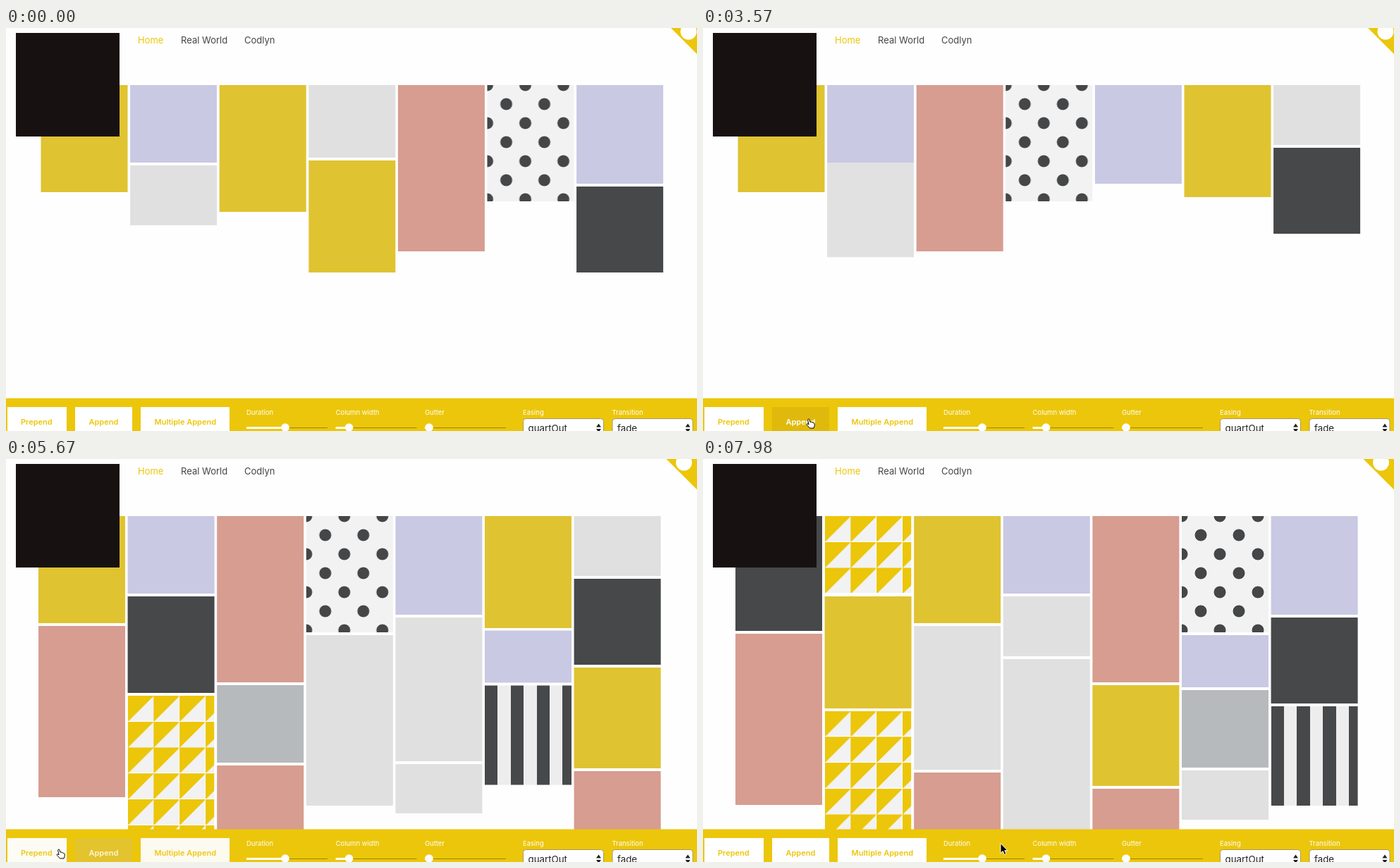
Recreate the animation shown at these times as an HTML page. Size 980 by 572 pixels, loop 8000 ms.

```html
<!DOCTYPE html>
<html lang="en">
<head>
<meta charset="utf-8">
<title>Stacking tiles</title>
<style>
html, body { margin: 0; width: 100%; height: 100%; overflow: hidden; background: #fefefe; }
#grid, svg { position: absolute; left: 0; top: 0; width: 980px; height: 572px; overflow: hidden; }
#grid { isolation: isolate; }
.tile { position: absolute; left: 0; top: 0; width: 122.5px; }
.yellow { background: #dfc331; }
.lilac { background: #c9c9e4; }
.light { background: #e0e0e0; }
.salmon { background: #d69d90; }
.dark { background: #47484a; }
.gray { background: #b7babd; }
.dots {
  --dot: radial-gradient(#454648 8.1px, #45464800 8.8px);
  background: var(--dot) 0 0 / 54px 54px, var(--dot) -27px -27px / 54px 54px, #f2f2f2;
}
.stripes { background: repeating-linear-gradient(90deg, #47484a 0 18.4px, #ededed 18.4px 36.8px); }
.triangles {
  background: linear-gradient(135deg, #ecc60a 50%, #f2f2f2 50.5%) 0 0 / 36.75px 36.75px;
  mask: repeating-linear-gradient(90deg, #000 0 36px, #0000 36px 36.75px),
        repeating-linear-gradient(#000 0 36px, #0000 36px 36.75px);
  mask-composite: intersect;
}
text { font-family: Inter, "Open Sans", sans-serif; white-space: pre; }
.nav { font-size: 13px; fill: #444; }
.label { font-size: 9.5px; fill: #fff; }
.btn { font-size: 11px; font-weight: 600; }
.value { font-size: 13.3px; fill: #222; }
</style>
</head>
<body>
<div id="grid"></div>
<svg viewBox="0 0 980 572">
  <rect x="14" y="7" width="147" height="147" fill="#171112"/>
  <g class="nav">
    <text x="187" y="22" style="fill:#ecc60a">Home</text>
    <text x="248" y="22">Real World</text>
    <text x="338" y="22">Codlyn</text>
  </g>
  <g id="corner">
    <path d="M943 0H1000V57Z" fill="#ecc60a"/>
    <circle cx="968" cy="5" r="11.5" fill="#fff"/>
  </g>
  <rect y="525.5" width="980" height="47" fill="#ecc60a"/>
  <g id="controls"></g>
  <g id="cursor">
    <path id="arrow" d="M0 0V14L3.3 11L5.5 16L8 15L5.8 10.2H10Z" fill="#000" stroke="#fff"/>
    <path id="hand" d="M.6 1.2C1-.4 2.6-.3 3 1L4 4.4C5 3.6 6 4 6.3 4.9C7.2 4.3 8.2 4.8 8.4 5.6C9.4 5.2 10 6 10.1 7L10.2 9.5L9 13H3.6L.2 9.4C-1.8 7.4-.4 6 1 7.2L2 8Z" fill="#fff" stroke="#000"/>
  </g>
</svg>
<script>
const LOOP = 8000, DURATION = 480, TOP = 81, PITCH = 126.6, GAP = 4, COLUMNS = 7, DRIFT = 8;
const $ = id => document.getElementById(id);
const clamp = v => Math.max(0, Math.min(1, v));
const mix = (a, b, p) => a + (b - a) * p;
const quartOut = p => 1 - (1 - clamp(p)) ** 4;

// One letter per tile, in stacking order from "a"
const specs = `yellow 152,lilac 110,yellow 180,light 103,salmon 236,dots 165,lilac 140,yellow 158.5,
light 85,dark 122,dark 137,light 204,salmon 243,lilac 74,light 242,yellow 143,gray 110,stripes 141,
triangles 200,light 70,salmon 160,salmon 160,triangles 110,dark 163`.split(/,\s*/);
const tiles = {};
specs.forEach((spec, i) => {
  const [kind, h] = spec.split(' ');
  const el = document.createElement('div');
  el.className = 'tile ' + kind;
  el.style.height = h + 'px';
  tiles[String.fromCharCode(97 + i)] = { el, h: +h, moves: [] };
});
for (const id of 'xw' + Object.keys(tiles).join('').slice(0, -2)) $('grid').append(tiles[id].el);

// time, order, left edge, lag of the lower rows
const steps = [
  [-9000, 'abcdefghij', 49.5, 0],
  [1755, 'abdefghij', 49.5, 0],
  [2350, 'abefghij', 49.5, 0],
  [3551, 'abefghijk', 49.5, 0],
  [3850, 'abefghijkl', 49.5, 0],
  [4688, 'abefghijklmnopq', 49.5, 0],
  [5000, 'abefghijklmnopqrstuv', 46, 0],
  [6037, 'wabefghijklmnopqrstuv', 46, 22],
  [6222, 'xwabefghijklmnopqrstuv', 46, 22],
  [7505, 'xwabefghijlmnopqrstuv', 46, 0]
];

// Each tile goes to the shortest column
function layout(order, left, unmeasured = '') {
  const ends = Array(COLUMNS).fill(TOP), spots = {};
  for (const id of order) {
    const c = ends.indexOf(Math.min(...ends));
    spots[id] = { x: left + c * PITCH, y: ends[c], a: 1 };
    ends[c] += (unmeasured.includes(id) ? 0 : tiles[id].h) + GAP;
  }
  return spots;
}

function poseAt(tile, t) {
  const move = tile.moves.findLast(m => m.t <= t);
  if (!move) return { x: 0, y: 0, a: 0 };
  const p = quartOut((t - move.t) / DURATION), { from, to } = move;
  return { x: mix(from.x, to.x, p), y: mix(from.y, to.y, p), a: mix(from.a, to.a, p) };
}

let previous = '';
for (const [time, order, left, lag] of steps) {
  const fresh = [...order].filter(id => !previous.includes(id)).join('');
  const spots = layout(order, left), entry = layout(order, left, fresh);
  for (const id of order) {
    const to = spots[id], t = time + (to.y > TOP ? lag : 0);
    const from = fresh.includes(id)
      ? { x: entry[id].x, y: entry[id].y - DRIFT, a: 0 }
      : poseAt(tiles[id], t);
    tiles[id].moves.push({ t, from, to });
  }
  for (const id of previous) {
    if (order.includes(id)) continue;
    const from = poseAt(tiles[id], time);
    tiles[id].moves.push({ t: time, from, to: { x: from.x, y: from.y + DRIFT, a: 0 } });
  }
  previous = order;
}

// label, x, width, text x, hover spans
const buttons = [
  ['Prepend', 2, 84, 21, [[5665, 6790]]],
  ['Append', 98, 81, 117.5, [[3290, 4350], [5490, 5650]]],
  ['Multiple Append', 191, 126, 210.5, [[4390, 5530]]]
];
const face = (label, x, w, tx, bg, fg) =>
  `<rect x="${x}" y="538" width="${w}" height="40" fill="${bg}"/><text class="btn" x="${tx}" y="562.5" fill="${fg}">${label}</text>`;
const slider = (label, x, knob) =>
  `<text class="label" x="${x}" y="548.5">${label}</text>
  <path d="M${x} 567.5H${x + 115}" stroke="#9c8410"/>
  <path d="M${x} 567.5H${knob}" stroke="#fff" stroke-width="3"/>
  <circle cx="${knob}" cy="567" r="5.8" fill="#fff"/>`;
const select = (label, x, value) =>
  `<text class="label" x="${x}" y="548.5">${label}</text>
  <rect x="${x + .5}" y="554.5" width="114" height="26" rx="4" fill="#fff" stroke="#a99a5c"/>
  <text class="value" x="${x + 7.5}" y="572.5">${value}</text>
  <path d="M${x + 104} 566.5l3.5-5l3.5 5zM${x + 104} 569l3.5 5l3.5-5z" fill="#222"/>`;
$('controls').innerHTML =
  buttons.map(([label, x, w, tx], i) =>
    face(label, x, w, tx, '#fff', '#ecc60a') +
    `<g id="hover${i}">${face(label, x, w, tx, '#dfba0c', '#fff')}</g>`).join('') +
  slider('Duration', 341, 396) + slider('Column width', 467.5, 486.5) + slider('Gutter', 594, 600) +
  select('Easing', 733, 'quartOut') + select('Transition', 859.5, 'fade');

const path = [
  [470, 529, 512], [640, 529, 512], [650, 508, 460], [1100, 508, 460], [1600, 332, 216],
  [2190, 332, 216], [2300, 340, 150], [2500, 340, 150], [3100, 161, 530], [3200, 161, 530],
  [3400, 148, 555], [4330, 148, 555], [4500, 221, 556], [5480, 221, 556], [5670, 73, 554],
  [5850, 73, 554], [6000, 59, 556], [6710, 59, 556], [7180, 360, 300], [7560, 360, 300],
  [7900, 422, 545.5], [LOOP, 422, 545.5]
];

function drawCursor(t) {
  $('cursor').style.display = t < path[0][0] ? 'none' : '';
  const i = path.findIndex(k => k[0] > t);
  if (i < 1) return;
  const [t0, x0, y0] = path[i - 1], [t1, x1, y1] = path[i], p = (t - t0) / (t1 - t0);
  $('cursor').setAttribute('transform', `translate(${mix(x0, x1, p)} ${mix(y0, y1, p)})`);
  const pointing = t > 3290 && t < 6790;
  $('arrow').style.display = pointing ? 'none' : '';
  $('hand').style.display = pointing ? '' : 'none';
}

function draw(t) {
  for (const tile of Object.values(tiles)) {
    const { x, y, a } = poseAt(tile, t), s = tile.el.style;
    s.display = a > 0.002 ? '' : 'none';
    s.transform = `translate(${x}px, ${y}px)`;
    s.opacity = a;
    s.zIndex = a < 0.5 ? 0 : 1;
  }
  buttons.forEach(([, , , , spans], i) => {
    $('hover' + i).style.opacity = Math.max(...spans.map(([on, off]) =>
      Math.min(clamp((t - on) / 150), 1 - clamp((t - off) / 150))));
  });
  $('corner').setAttribute('transform', `translate(${t < 5000 ? 0 : -6.5} 0)`);
  drawCursor(t);
}

const start = performance.now();
function tick() {
  draw((performance.now() - start) % LOOP);
  requestAnimationFrame(tick);
}
tick();
</script>
</body>
</html>
```
